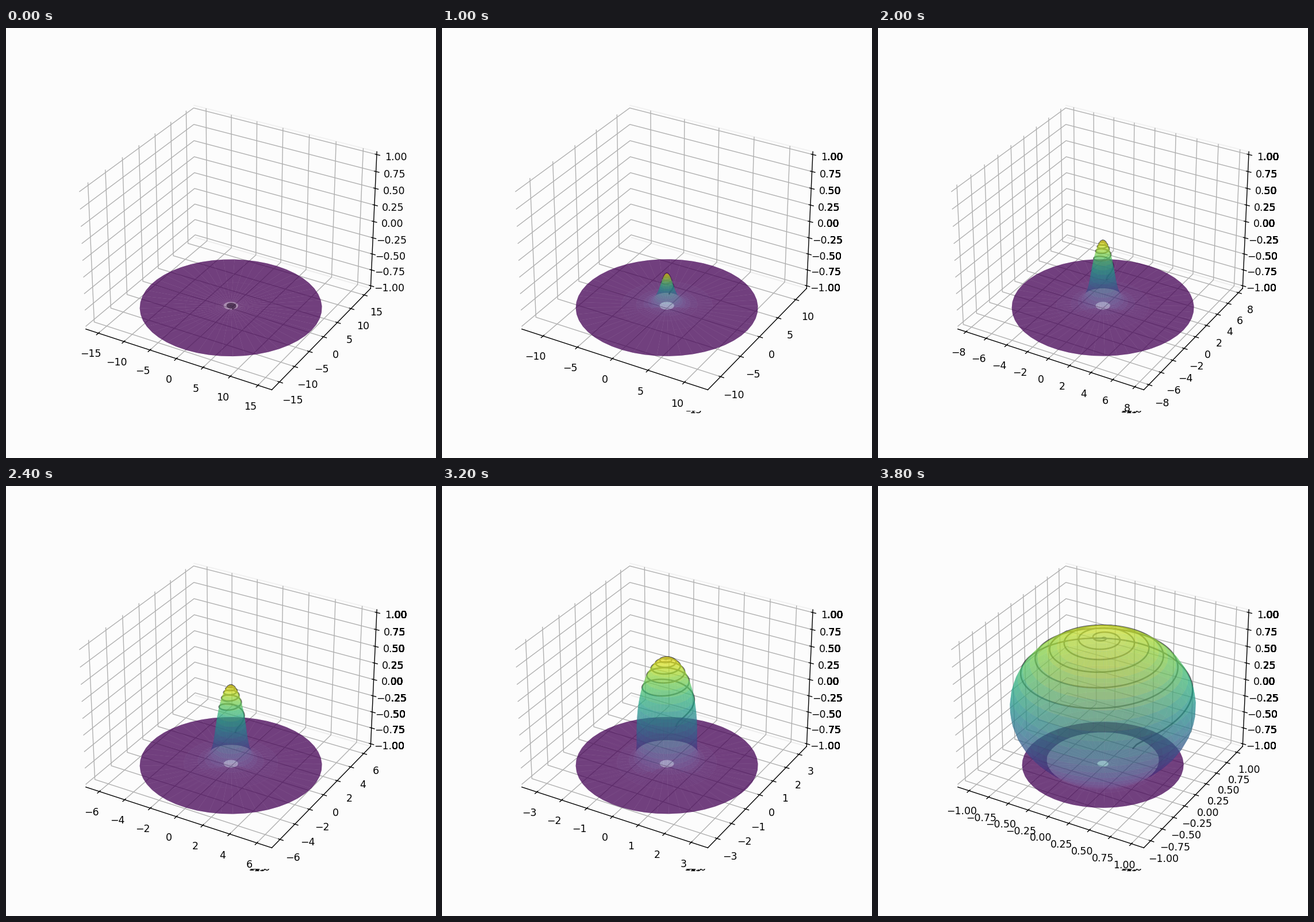
Recreate the animation shown at these times as a matplotlib script. Size 748 by 748 pixels, loop 4000 ms.

```python
import numpy as np
import matplotlib.pyplot as plt
from matplotlib.animation import FuncAnimation
from matplotlib.ticker import MaxNLocator
from matplotlib.transforms import Bbox

FRAMES, INTERVAL = 20, 200
SIZE, DPI = 748, 125
PAD = 25 / 24  # room between the data limits and the box
PAPER = (252 / 255,) * 3

fig = plt.figure(figsize=(SIZE / DPI, SIZE / DPI), dpi=DPI, facecolor=PAPER)
ax = fig.add_subplot(projection="3d", facecolor=PAPER)
for axis, edge in ((ax.xaxis, "none"),
                   (ax.yaxis, (0.9, 0.9, 0.9, 0.8)),
                   (ax.zaxis, (0.925, 0.925, 0.925, 0.6))):
    axis.pane.set_facecolor("none")
    axis.pane.set_edgecolor(edge)


def stereographic(sin, cos):
    # The tiny term keeps the south pole finite.
    return sin / (1 + cos + 1e-16)


theta, phi = np.meshgrid(np.linspace(0, np.pi, 25),
                         np.linspace(0, 2 * np.pi, 50))
turn = np.linspace(0, 1, 1000)
height = np.sqrt(1 - turn ** 2)


def morph(sin, cos, t):
    """Blend from the flat projection (t=0) to the sphere (t=1)."""
    radius = (1 - t) * stereographic(sin, cos) + t * sin
    return radius, t * cos - (1 - t)


def ticks(limit):
    locs = MaxNLocator(9, steps=[1, 2, 2.5, 5, 10]).tick_values(-limit, limit)
    return locs[np.abs(locs) <= limit + 1e-9]


drawn = []
ghosts = []


def show(n):
    t = n / FRAMES
    while drawn:
        drawn.pop().remove()

    r, z = morph(np.sin(theta), np.cos(theta), t)
    drawn.append(ax.plot_surface(r * np.cos(phi), r * np.sin(phi), z,
                                 cmap="viridis", alpha=0.5))
    s, h = morph(turn, height, t)
    drawn.extend(ax.plot(s * np.sin(40 * turn), s * np.cos(40 * turn), h,
                         color="black", alpha=0.6))

    limit = 1.1 * r.max()
    ax.set_xticks(ticks(limit))
    ax.set_yticks(ticks(limit))
    ax.set_zticks(ticks(1))
    ax.set_xlim(-limit * PAD, limit * PAD)
    ax.set_ylim(-limit * PAD, limit * PAD)
    ax.set_zlim(-PAD, PAD)

    for born, text in ghosts:
        text.set_visible(born < n)
    return drawn


def collect_ghosts():
    """Labels reaching outside the axes are never wiped and pile up."""
    found = []
    for n in range(FRAMES - 1):
        show(n)
        fig.draw_without_rendering()
        box = ax.bbox
        right = Bbox.from_extents(box.x1, 0, SIZE, SIZE)
        below = Bbox.from_extents(0, 0, box.x1, box.y0)
        for tick in ax.xaxis.get_major_ticks() + ax.zaxis.get_major_ticks():
            label = tick.label1
            extent = label.get_window_extent()
            for strip, outside in ((right, extent.x1 > box.x1),
                                   (below, extent.y0 < box.y0)):
                if outside:
                    found.append((n, label.get_position(), label.get_text(),
                                  label.get_ha(), label.get_va(), strip))
    for n, (x, y), string, ha, va, strip in found:
        text = fig.text(x, y, string, ha=ha, va=va, transform=ax.transData)
        text.set_clip_box(strip)
        text.set_clip_on(True)
        ghosts.append((n, text))


collect_ghosts()
show(0)
anim = FuncAnimation(fig, show, frames=FRAMES, interval=INTERVAL,
                     blit=False, repeat=True)
plt.show()
```
